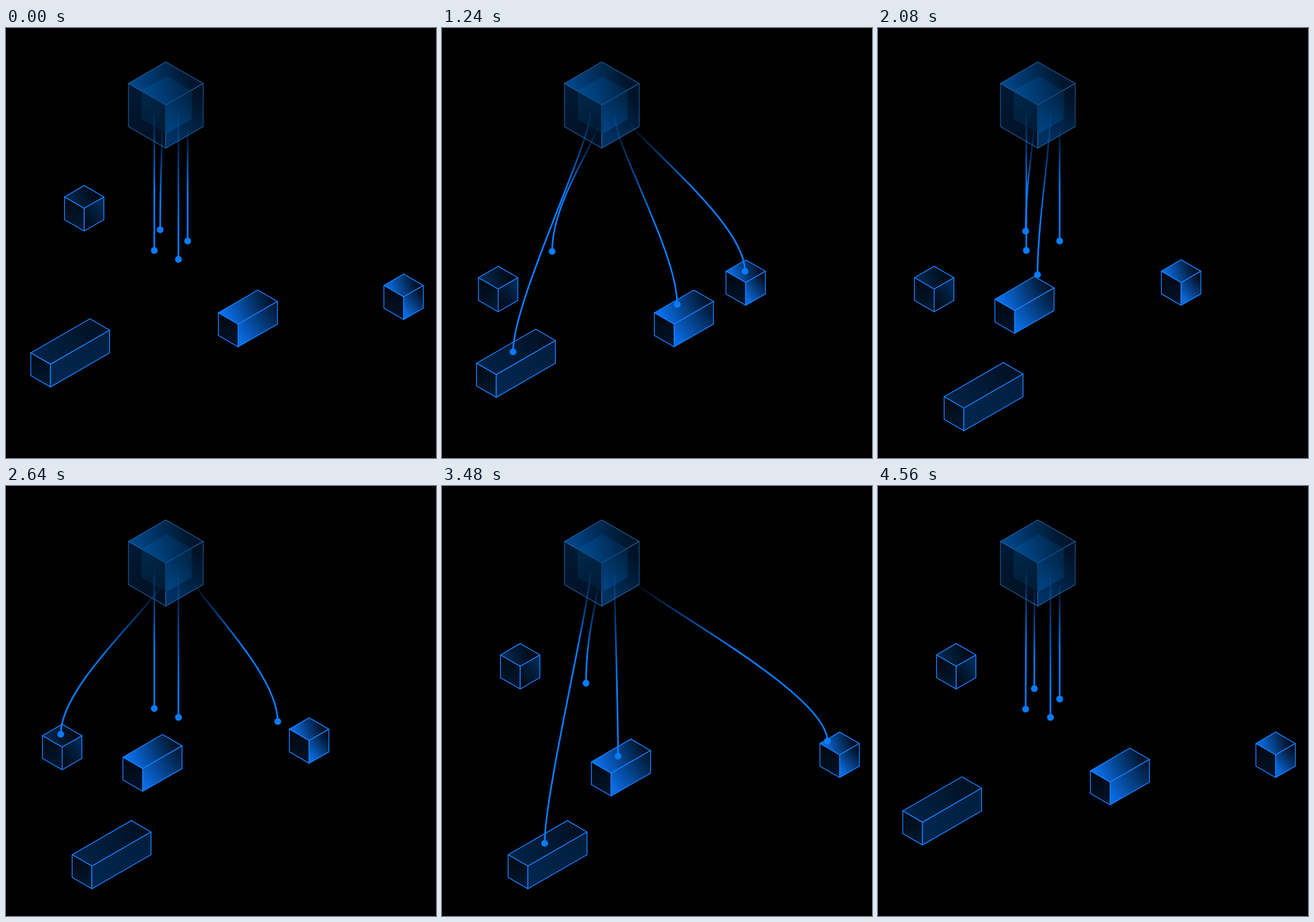
These frames come from a looping animation (748x748 px, 4600 ms). An HTML page with a canvas:

```html
<!DOCTYPE html>
<html lang="en">
<head>
<meta charset="utf-8">
<style>
  html, body { margin: 0; height: 100%; overflow: hidden; background: #000; }
  canvas { display: block; width: 748px; height: 748px; }
</style>
</head>
<body>
<canvas id="stage" width="748" height="748"></canvas>
<script>
const ctx = document.getElementById('stage').getContext('2d');
const LOOP = 4600, STEP = 40, LEG = 434;
const BLUE = '#077cff';

// Each arm reaches for its box, waits, carries it to the other spot and goes home, twice per loop.
// trips: [start, wait, upward bow of the reach]
const arms = [
  { anchor: [272, 165], pull: 30, rest: [272, 352.5], glow: [170, 300], grip: [-2.5, -2.5],
    size: 1, spots: [[136, 274], [97.7, 414.5]], trips: [[-43, 185, 0], [2002, 284, 19]],
    top: ['#01264c', '#000913'], left: ['#00070f', '#001a34'], right: ['#000b18', '#002a54'] },
  { anchor: [316, 148], pull: 30, rest: [316, 370.5], glow: [165, 280], grip: [-1.2, 0],
    size: 1, spots: [[691.7, 428], [527.3, 403.2]], trips: [[205, 187, 0], [2349, 202, 0]],
    top: ['#0a66d4', '#001226'], left: ['#00060e', '#00142a'], right: ['#0a68d8', '#000e20'] },
  { anchor: [258, 148], pull: 55, rest: [258, 387], glow: [140, 285], grip: [-5, 0],
    size: 3, spots: [[146, 505.8], [218, 582]], trips: [[424, 245, 0], [3028, 252, 0]],
    top: ['#002348', '#001022'], left: ['#000810', '#001a34'], right: ['#00264e', '#001e3e'] },
  { anchor: [300, 150], pull: 55, rest: [300, 402.5], glow: [135, 345], grip: [-5, 0],
    size: 2, spots: [[438, 455.8], [272, 432.2]], trips: [[869, 111, 0], [2790, 86, 0]],
    top: ['#0a70ec', '#001226'], left: ['#00070f', '#00142c'], right: ['#0a6ce4', '#001a36'] }
];

const ease = p => { p = Math.min(1, Math.max(0, p)); return p * p * (3 - 2 * p); };
const mix = (a, b, k) => [a[0] + (b[0] - a[0]) * k, a[1] + (b[1] - a[1]) * k];

function gradient([x0, y0], [x1, y1], colors) {
  const g = ctx.createLinearGradient(x0, y0, x1, y1);
  colors.forEach((c, i) => g.addColorStop(i / (colors.length - 1), c));
  return g;
}

function face(points, fill, stroke, width) {
  ctx.beginPath();
  points.forEach(p => ctx.lineTo(...p));
  ctx.closePath();
  ctx.fillStyle = fill;
  ctx.fill();
  if (!stroke) return;
  ctx.strokeStyle = stroke;
  ctx.lineWidth = width;
  ctx.stroke();
}

// Isometric block seen from above; x, y is the far top corner.
function block([x, y], u, v, h, size, look, stroke, width) {
  const far = [x, y], right = [x + u, y + v];
  const left = [x - u * size, y + v * size], near = [left[0] + u, left[1] + v];
  const down = ([a, b]) => [a, b + h];
  face([far, right, near, left], gradient(mix(left, near, 0.3), mix(far, right, 0.6), look.top), stroke, width);
  face([left, near, down(near), down(left)], gradient(left, down(near), look.left), stroke, width);
  face([near, right, down(right), down(near)],
    gradient(mix(near, down(near), 0.6), mix(right, down(right), 0.4), look.right), stroke, width);
}

function hub() {
  block([278, 59], 65, 37.5, 75, 1, {
    top: ['#004384', '#00162c'], left: ['#001a36', '#000f20'], right: ['#003161', '#001225']
  }, '#1d65a8', 1.1);
  block([279.5, 84], 43.5, 25, 50, 1, {
    top: ['#00529a80', '#00366a70'], left: ['#003a6680', '#00284a60'], right: ['#00509a90', '#00346080']
  });
}

function pose({ trips, spots, size, grip, rest }, time) {
  let carried = 0, reach = 0, lift = 0;
  const clock = (time - trips[0][0] + LOOP) % LOOP;
  for (const [start, wait, bow] of trips) {
    const t = clock - (start - trips[0][0]);
    const out = ease(t / LEG);
    const moved = ease((t - LEG - wait) / LEG);
    carried = moved - carried;
    reach += out - ease((t - 2 * LEG - wait) / LEG);
    lift += bow * 4 * out * (1 - out);
  }
  // After both trips the difference of the two moves must read from the first spot.
  const box = mix(spots[0], spots[1], Math.abs(carried));
  const hold = [box[0] + 17.2 * (1 - size) + grip[0], box[1] + 9.9 * (1 + size) + grip[1]];
  const tip = mix(rest, hold, reach);
  tip[1] -= lift;
  return { box, tip };
}

function rope({ anchor: [x, y], pull, glow }, [tx, ty]) {
  ctx.beginPath();
  ctx.moveTo(x, y);
  ctx.bezierCurveTo(x, y + pull, tx, ty - 90, tx, ty);
  ctx.strokeStyle = gradient([0, glow[0]], [0, glow[1]], ['#077cff00', BLUE]);
  ctx.lineWidth = 2.9;
  ctx.stroke();
  ctx.beginPath();
  ctx.arc(tx, ty, 5.9, 0, 7);
  ctx.fillStyle = BLUE;
  ctx.fill();
}

function draw(time) {
  ctx.fillStyle = '#000';
  ctx.fillRect(0, 0, 748, 748);
  ctx.lineJoin = 'round';
  const poses = arms.map(arm => pose(arm, time));
  hub();
  arms.forEach((arm, i) => block(poses[i].box, 34.3, 19.8, 39.5, arm.size, arm, '#1680ff', 1.5));
  arms.forEach((arm, i) => rope(arm, poses[i].tip));
}

const begin = performance.now();
function tick() {
  const time = (performance.now() - begin) % LOOP;
  draw(Math.floor(time / STEP) * STEP);
  requestAnimationFrame(tick);
}
tick();
</script>
</body>
</html>
```
